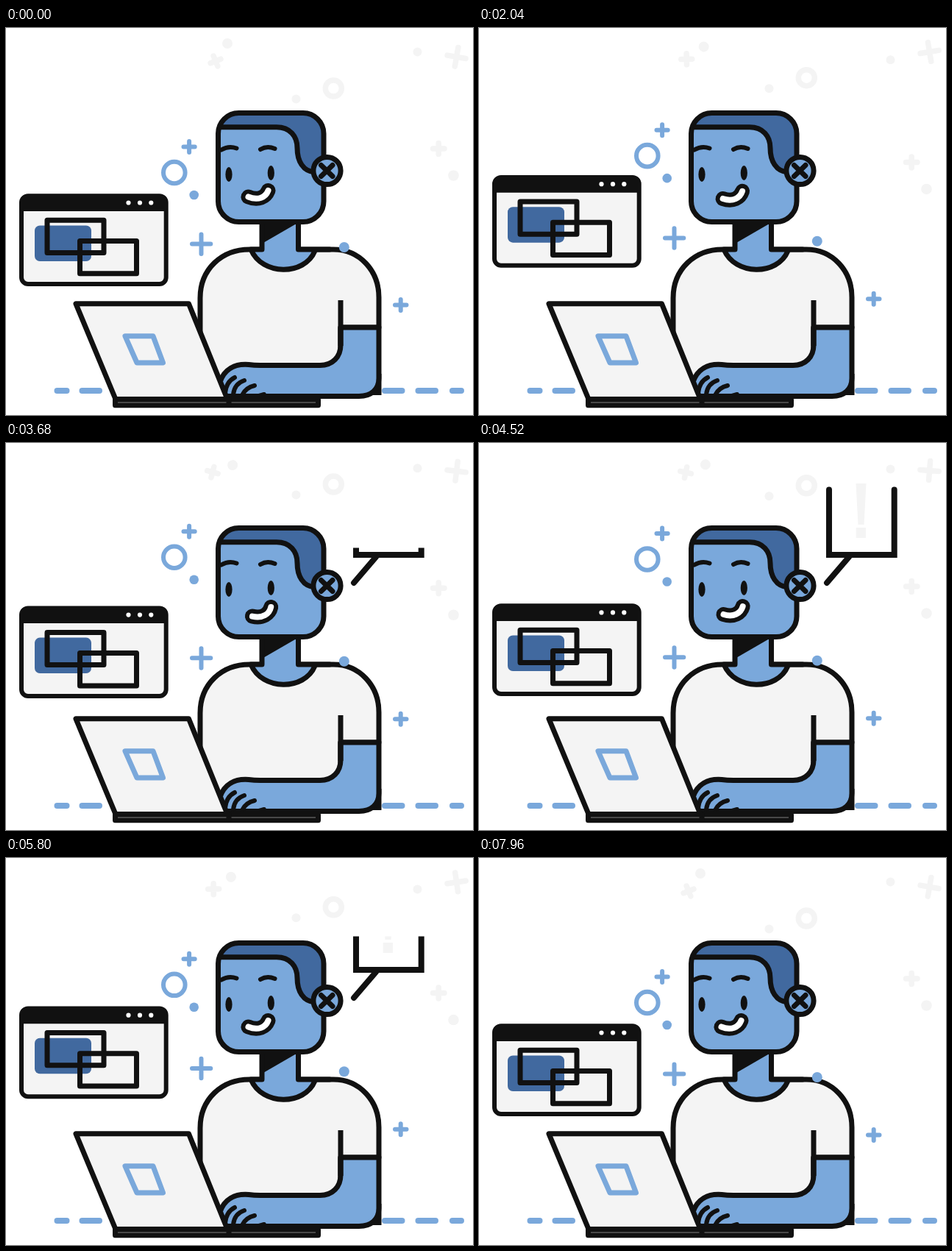
Recreate the animation shown at these times as an HTML page. Size 635x526 px, loop 8 s.

```html
<!DOCTYPE html>
<html lang="en">
<head>
<meta charset="utf-8">
<title>At the laptop</title>
<style>
  html, body { margin: 0; width: 100%; height: 100%; overflow: hidden; background: #fff; }
  svg { display: block; width: 100%; height: 100%; }
  .ink { stroke: #111; stroke-width: 7; stroke-linecap: round; stroke-linejoin: round; fill: none; }
  .sky { fill: #7aa8db; }
  .navy { fill: #41699f; }
  .pale { fill: #f4f4f4; }
  .black { fill: #111; }
  .skyLine { stroke: #7aa8db; stroke-width: 6; stroke-linecap: round; stroke-linejoin: round; fill: none; }
  .paleLine { stroke: #f4f4f4; stroke-width: 7.5; stroke-linecap: round; fill: none; }
</style>
</head>
<body>
<svg viewBox="0 0 635 526">
  <defs>
    <clipPath id="headClip"><rect x="288.5" y="115.5" width="143.5" height="148" rx="28"/></clipPath>
    <clipPath id="wipe"><rect id="wipeBox" x="460" y="0" width="120" height="200"/></clipPath>
  </defs>

  <!-- faint background shapes -->
  <g id="spinPair">
    <circle class="pale" cx="301" cy="21" r="7"/>
    <path class="paleLine" d="M-7.5 0H7.5M0 -7.5V7.5" transform="translate(285 45) rotate(-22)"/>
  </g>
  <g id="paleRise">
    <circle class="paleLine" cx="445.3" cy="82" r="11"/>
    <circle class="pale" cx="394.5" cy="96.5" r="6"/>
  </g>
  <g id="paleFall">
    <path class="paleLine" d="M580.5 164H596M588.2 156.5V171.5"/>
    <circle class="pale" cx="608.5" cy="200.5" r="7.3"/>
  </g>
  <circle id="paleDot" class="pale" cx="559.5" cy="32.5" r="6"/>
  <path id="palePlus" class="paleLine" d="M-12.7 0H12.7M0 -13V13"/>

  <!-- desk line -->
  <path class="skyLine" style="stroke-width:8" d="M69.5 493H82.5M103.5 493H127M515 493H538.5M560.5 493H584M607 493H619"/>

  <!-- floating window -->
  <g id="win">
    <rect class="ink pale" style="fill:#f4f4f4;stroke-width:6" x="21" y="228.3" width="196.7" height="119.7" rx="9"/>
    <path class="black" d="M19 249V238Q19 226 31 226H208Q220 226 220 238V249Z"/>
    <g fill="#fff"><circle cx="166.5" cy="237.5" r="3.1"/><circle cx="182" cy="237.5" r="3.1"/><circle cx="197.3" cy="237.5" r="3.1"/></g>
    <rect class="navy" x="39" y="268.5" width="77" height="48.5" rx="7"/>
    <path class="ink" d="M56 261.3H133V305.5H56ZM100.5 289.5H177.5V333.8H100.5Z"/>
  </g>

  <!-- body -->
  <path class="ink" style="fill:#f4f4f4" d="M264 500V367C264 328 293 301 331 301H445C481 301 507 330 507 366V407H455V500"/>
  <path class="sky" d="M348 262H397.5V301H420C406 337 348 337 333 303L348 301Z"/>
  <path class="black" d="M346 263H400L349 292.5Z"/>
  <path class="ink" d="M348 264V301H333C348 337 406 337 420 303M397.5 264V301H440"/>

  <!-- arm and hand -->
  <path class="black" d="M503.5 470H510.5V499H488Z"/>
  <path class="ink" style="fill:#7aa8db" d="M455 407H507V476C507 491 497 500.5 480 500.5H296L291 481C297 464 311 456 330 457.5C337 458.5 340 458.5 346 458.5H427C444 458.5 455 447 455 431Z"/>
  <path class="ink" style="stroke-linecap:butt" d="M455 370V432"/>
  <path class="ink" style="stroke-width:6" d="M298 496C299 486 303 479 311 475M309 498C310 489 315 482 324 479M321 499C324 493 329 488 338 486M344 500L351 498"/>

  <!-- laptop -->
  <path class="ink" style="fill:#f4f4f4" d="M148.5 505.3H424.5V512.8H148.5Z"/>
  <path class="ink" d="M303 505V512"/>
  <path class="ink" style="fill:#f4f4f4" d="M95 374.8H248.5L301 504.5H149Z"/>
  <path class="skyLine" style="stroke-width:7" d="M162 418.8H200L213.5 455H178Z"/>

  <!-- head -->
  <rect class="sky" x="288.5" y="115.5" width="143.5" height="148" rx="28"/>
  <g clip-path="url(#headClip)">
    <path class="ink" style="fill:#41699f" d="M285 134.8H368C386 134.8 396 147 396 163C396 181 404 195 420 196L440 196V108H285Z"/>
  </g>
  <rect class="ink" x="288.5" y="115.5" width="143.5" height="148" rx="28"/>
  <circle class="ink" style="fill:#7aa8db" cx="436.5" cy="194" r="18.6"/>
  <path class="ink" d="M428.5 186.5L444 201.5M444 186.5L428.5 201.5"/>
  <path class="ink" style="stroke-width:6" d="M293 165.5Q303 159.5 313.500 163.500M346 165Q355 159.500 365.500 164"/>
  <ellipse class="black" cx="303" cy="199" rx="4.6" ry="10"/>
  <ellipse class="black" cx="360.3" cy="197" rx="4.6" ry="10"/>
  <g id="mouth" fill="none" stroke-linecap="round">
    <path stroke="#111" stroke-width="20" d="M329.500 229.500C343 235 353 230 356.500 221"/>
    <path stroke="#fff" stroke-width="8" d="M329.500 229.500C343 235 353 230 356.500 221"/>
  </g>

  <!-- drifting accents -->
  <g id="rise">
    <path class="skyLine" d="M241.5 161.5H256.700M249.100 154V169"/>
    <circle class="skyLine" cx="228.800" cy="196.500" r="14.800"/>
    <circle class="sky" cx="255.700" cy="227" r="6.300"/>
  </g>
  <g id="bob">
    <path class="skyLine" d="M253 293.600H278.300M265.500 280.500V307M529 376.500H544.500M536.700 369V384"/>
    <circle class="sky" cx="459.800" cy="298" r="7"/>
  </g>

  <!-- speech bubble -->
  <g clip-path="url(#wipe)">
    <path class="ink" style="stroke-width:8;stroke-linejoin:miter" d="M476 63.500V152H564.700V63.500M503 155L473 190"/>
    <path class="pale" d="M512.500 55H526.500L523.500 111H515.500ZM512.700 115H526V129H512.700Z"/>
  </g>
</svg>
<script>
  const LOOP = 8000, STEP = 40, LAST = LOOP / STEP - 1;
  const el = id => document.getElementById(id);
  const place = (id, transform) => el(id).setAttribute('transform', transform);
  const lift = (id, y) => place(id, `translate(0 ${y})`);
  const ramp = (t, from, to) => Math.min(1, Math.max(0, (t - from) / (to - from)));
  const triangle = x => 1 - Math.abs(2 * (x % 1) - 1);

  function draw(now) {
    const frame = Math.floor(now % LOOP / STEP);
    const t = frame * STEP;
    const slow = triangle(frame / LAST);
    const fast = triangle(2 * frame / LAST);

    lift('win', -26 * fast);
    lift('bob', -8.4 * fast);
    lift('rise', -44.6 * slow);
    lift('paleRise', -28 * slow);
    lift('paleFall', 36 * slow);
    lift('paleDot', 11 * fast);
    place('spinPair', `rotate(${40 * slow} 291 36.2)`);
    place('palePlus', `translate(612.6 ${39.3 - 7 * fast}) rotate(${10 - 20 * fast})`);

    const smile = ramp(t, 1600, 2700) - ramp(t, 4000, 5200);
    place('mouth', `translate(${5 * smile} ${4 * smile}) rotate(${-9 * smile} 343 228)`);

    // The bubble is uncovered from its tail up, then wiped away downwards.
    const top = 194 - 140 * ramp(t, 3400, 4160) + 140 * ramp(t, 5500, 6300);
    el('wipeBox').setAttribute('y', top);
    el('wipeBox').setAttribute('height', Math.max(0, 200 - top) * (t > 3380 && t < 6300));
  }

  const start = performance.now();
  function tick() {
    draw(performance.now() - start);
    requestAnimationFrame(tick);
  }
  tick();
</script>
</body>
</html>
```
